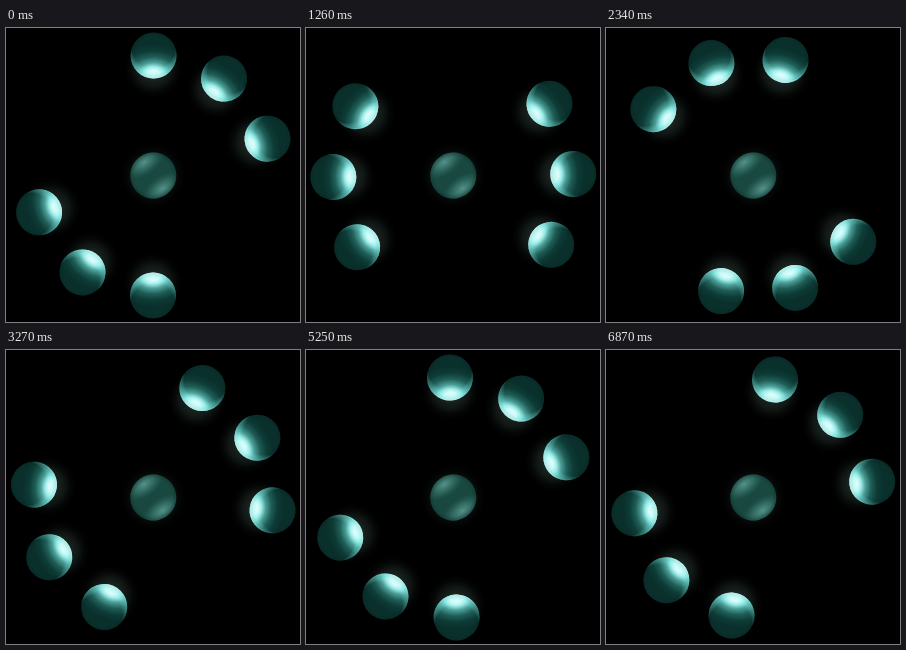
An HTML page for the animation above (6900 ms loop, 294x294 px).

```html
<!DOCTYPE html>
<html lang="en">
<head>
<meta charset="utf-8">
<title>Orbiting spheres</title>
<style>
  html, body { margin: 0; width: 100%; height: 100%; overflow: hidden; background: #000; }
  svg { display: block; width: 100vw; height: 100vh; }
</style>
</head>
<body>
<svg viewBox="0 0 294 294">
  <defs>
    <radialGradient id="lit" gradientUnits="userSpaceOnUse" cx="0" cy="0" r="1"
      gradientTransform="translate(-20 0) scale(31 42)">
      <stop offset="0" stop-color="#fff"/>
      <stop offset=".16" stop-color="#f0ffff"/>
      <stop offset=".28" stop-color="#9cece8"/>
      <stop offset=".42" stop-color="#4a9d96"/>
      <stop offset=".6" stop-color="#1f5d56"/>
      <stop offset=".8" stop-color="#0d3b36"/>
      <stop offset="1" stop-color="#0a302c"/>
    </radialGradient>
    <radialGradient id="crescent" gradientUnits="userSpaceOnUse" cx="9" cy="0" r="32">
      <stop offset=".68" stop-color="#7ff0ea" stop-opacity="0"/>
      <stop offset=".86" stop-color="#7ff0ea" stop-opacity=".4"/>
      <stop offset="1" stop-color="#b4fffa" stop-opacity=".75"/>
    </radialGradient>
    <radialGradient id="rim" gradientUnits="userSpaceOnUse" cx="0" cy="0" r="23">
      <stop offset=".82" stop-color="#041a18" stop-opacity="0"/>
      <stop offset="1" stop-color="#041a18" stop-opacity=".25"/>
    </radialGradient>
    <radialGradient id="halo" gradientUnits="userSpaceOnUse" cx="-13" cy="0" r="31">
      <stop offset=".3" stop-color="#1c2622"/>
      <stop offset=".6" stop-color="#0e1412"/>
      <stop offset="1" stop-color="#000" stop-opacity="0"/>
    </radialGradient>
    <radialGradient id="soft" gradientUnits="userSpaceOnUse" cx="0" cy="0" r="1"
      gradientTransform="translate(-16 0) scale(13 23)">
      <stop offset="0" stop-color="#5f9f97" stop-opacity=".85"/>
      <stop offset=".45" stop-color="#458279" stop-opacity=".6"/>
      <stop offset="1" stop-color="#2a665f" stop-opacity="0"/>
    </radialGradient>
    <radialGradient id="dim" gradientUnits="userSpaceOnUse" cx="0" cy="0" r="34">
      <stop offset=".6" stop-color="#0c1210"/>
      <stop offset="1" stop-color="#000" stop-opacity="0"/>
    </radialGradient>
    <g id="ball">
      <circle cx="-13" r="31" fill="url(#halo)"/>
      <circle r="23" fill="url(#lit)"/>
      <circle r="23" fill="url(#rim)"/>
      <circle r="23" fill="url(#crescent)"/>
    </g>
    <g id="trio">
      <use href="#ball" transform="rotate(-36) translate(120)"/>
      <use href="#ball" transform="translate(120)"/>
      <use href="#ball" transform="rotate(36) translate(120)"/>
    </g>
  </defs>
  <rect width="294" height="294"/>
  <g transform="translate(147.3 147.5)">
    <g id="wheel">
      <use href="#trio"/>
      <use href="#trio" transform="rotate(180)"/>
    </g>
    <g transform="rotate(55)">
      <circle r="34" fill="url(#dim)"/>
      <circle r="23" fill="#18483f"/>
      <circle r="23" fill="url(#soft)"/>
      <circle r="23" fill="url(#soft)" transform="rotate(180)"/>
      <circle r="23" fill="url(#rim)"/>
    </g>
  </g>
</svg>
<script>
  const LOOP = 6900, TICK = 30, POSES = 210;
  const wheel = document.getElementById('wheel');
  const start = performance.now();

  function draw(now) {
    const tick = Math.floor((Math.max(0, now - start) % LOOP) / TICK);
    // Every eleventh tick repeats the pose; the loop opens on a short hold.
    const pose = Math.max(2, tick - Math.floor(tick / 11));
    wheel.setAttribute('transform', `rotate(${133 - 720 * pose / POSES})`);
    requestAnimationFrame(draw);
  }
  draw(start);
</script>
</body>
</html>
```
